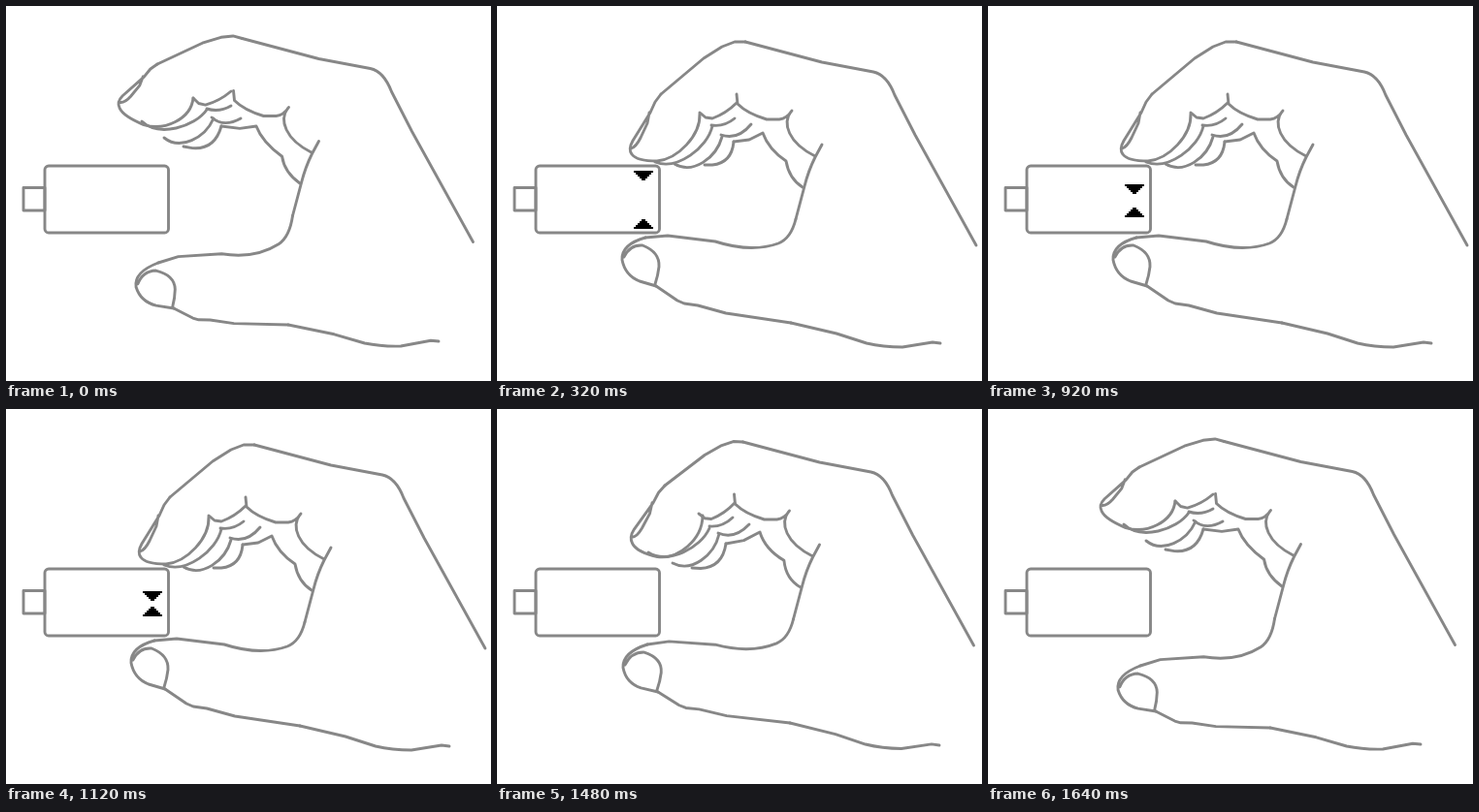
An HTML page for the animation above (1800 ms loop, 500x387 px).

```html
<!DOCTYPE html>
<html lang="en">
<head>
<meta charset="utf-8">
<title>Squeeze to release</title>
<style>
  html, body { margin: 0; width: 100%; height: 100%; overflow: hidden; background: #fff; }
  svg { display: block; width: 500px; height: 387px; }
  .line { fill: none; stroke: #878787; stroke-width: 2.9; stroke-linejoin: round; }
  #hand path { stroke-linecap: round; vector-effect: non-scaling-stroke; }
</style>
</head>
<body>
<svg viewBox="0 0 500 387">
  <g class="line">
    <rect x="18" y="187.5" width="22" height="23.5"/>
    <rect x="40" y="165" width="127.5" height="69" rx="4"/>
    <g id="hand"></g>
  </g>
  <g id="arrows" shape-rendering="crispEdges">
    <path id="down"/>
    <path id="up"/>
  </g>
</svg>
<script>
const LOOP = 1800, STEP = 40, SQUEEZE_START = 320, SQUEEZE_END = 1280, LAST_STEP = 23;

// Every part is drawn once, in the closed pose. Its pins carry it to the other
// poses: one pin slides it, two also turn and scale it, three also shear it.
const parts = [
  { // back of the hand, knuckles, palm
    shape: `M494 247L431 133 410 92Q402 71 388 68L335 58 256 37
            M247 91L248 101Q258 111 278 117L291 117Q299 116 304 108
            M303 109C294 121 300 141 328 155
            M335 143L328 156Q321 170 317 186L308 220`,
    closed: "256,37", near: "253.5,34", open: "243.5,33.5"
  },
  { // index finger: ridge, tip with nail, crease
    shape: "M256 37L245 37 232 42 213 54 169 91",
    closed: "256,37 169,91", near: "253.5,34 173,79", open: "243.5,33.5 156,60"
  },
  {
    shape: `M169 91L163 99 158 110 140 139Q135 148 139 153Q144 160 165 160C186 158 210 134 209 111
            M157 110L155 121 148 136Q143 146 138 147`,
    closed: "169,91 137,147 209,111", near: "173,79 138,132 212,110", open: "156,60 116,99 193,95"
  },
  {
    shape: "M209 110L215 115 222 116Q236 111 247 100",
    closed: "209,110 247,100", near: "208,108 245,97", open: "193,95 232,88"
  },
  { // middle finger
    shape: "M163 161C186 170 217 146 222 124",
    closed: "163,161 222,124", near: "156,148 219,123", open: "140,119 207,107"
  },
  {
    shape: "M221 123Q234 125 245 116",
    closed: "221,123 245,116", near: "219,121 243,112", open: "207,106 232,103"
  },
  { // ring finger
    shape: "M183 163C202 174 226 157 232 135",
    closed: "183,163 232,135", near: "181,159 229,129", open: "163,136 214,116"
  },
  {
    shape: "M231 133Q248 139 262 122",
    closed: "231,133 262,122", near: "228,128 260,119", open: "212,115 242,116"
  },
  { // little finger and its root
    shape: "M214 164L222 164Q242 162 244 140",
    closed: "214,164 244,140", near: "201,164 236,139", open: "183,145 222,124"
  },
  {
    shape: "M244 140L260 138 274 131Q280 148 298 160Q301 178 315 187",
    closed: "244,140 274,131 315,187", near: "236,139 271,127 313,184", open: "222,124 258,124 303,183"
  },
  { // thumb: web, tip with nail, underside
    shape: "M308 220Q303 240 290 245Q262 255 225 243L176 237 153 239",
    closed: "308,220 263,250 153,239", near: "305.5,217 262,248 155,243", open: "295.5,216.5 257,256 157,265"
  },
  {
    shape: `M153 239Q128 246 129 262Q132 278 147 284L164 289
            M131 259Q137 246 150 247Q168 254 167 269Q166 278 163 287`,
    closed: "153,239 129,261 164,289", near: "155,243 130,266 166,292", open: "157,265 134,289 173,312"
  },
  {
    shape: "M164 289L186 304 193 307 207 309 236 317 303 327",
    closed: "164,289 303,327", near: "166,292 302,324", open: "173,312 291,329"
  },
  { // wrist
    shape: "M303 327L350 338 381 348Q398 352 418 352L449 347 457 348",
    closed: "303,327 457,348", near: "302,324 456,347", open: "291,329 446,346"
  }
];

const schedule = [
  [160, "open"], [240, "half"], [320, "near"], [1480, "closed"],
  [1560, "near"], [1640, "half"], [LOOP, "open"]
];

const [hand, arrows, down, up] = ["hand", "arrows", "down", "up"].map(id => document.getElementById(id));

const parse = text => text.split(" ").map(pair => pair.split(",").map(Number));

function pinsOf(part, pose) {
  if (pose !== "half") return parse(part[pose]);
  const open = parse(part.open);
  return parse(part.near).map(([x, y], i) => [(x + open[i][0]) / 2, (y + open[i][1]) / 2]);
}

// Coordinate frame spanned by the pins; missing ones are filled in square.
function frame([[x, y], second = [x + 1, y], third]) {
  const dx = second[0] - x, dy = second[1] - y;
  const [ex, ey] = third ? [third[0] - x, third[1] - y] : [-dy, dx];
  return new DOMMatrix([dx, dy, ex, ey, x, y]);
}

for (const part of parts) {
  part.path = document.createElementNS("http://www.w3.org/2000/svg", "path");
  part.path.setAttribute("d", part.shape);
  part.toPins = frame(pinsOf(part, "closed")).inverse();
  hand.append(part.path);
}

function setPose(pose) {
  for (const part of parts) {
    const { a, b, c, d, e, f } = frame(pinsOf(part, pose)).multiply(part.toPins);
    part.path.setAttribute("transform", `matrix(${[a, b, c, d, e, f]})`);
  }
}

// Stepped arrowhead: five rows, 2px high, from 20px down to 4px wide.
let arrowhead = "";
for (let row = 0; row < 5; row++) {
  const width = 20 - 4 * row;
  arrowhead += `M${-width / 2},${2 * row}h${width}v2h${-width}z`;
}
down.setAttribute("d", arrowhead);
up.setAttribute("d", arrowhead);

let shownPose;
function draw(now) {
  const t = now % LOOP;
  const pose = schedule.find(([end]) => t < end)[1];
  if (pose !== shownPose) setPose(shownPose = pose);

  const squeezing = t >= SQUEEZE_START && t < SQUEEZE_END;
  arrows.style.display = squeezing ? "" : "none";
  if (squeezing) {
    const progress = Math.floor((t - SQUEEZE_START) / STEP) / LAST_STEP;
    down.setAttribute("transform", `translate(151 ${170 + Math.round(21 * progress)})`);
    up.setAttribute("transform", `translate(151 ${230 - Math.round(18 * progress)}) scale(1 -1)`);
  }
}

const start = performance.now();
function tick() {
  draw(performance.now() - start);
  requestAnimationFrame(tick);
}
tick();
</script>
</body>
</html>
```
